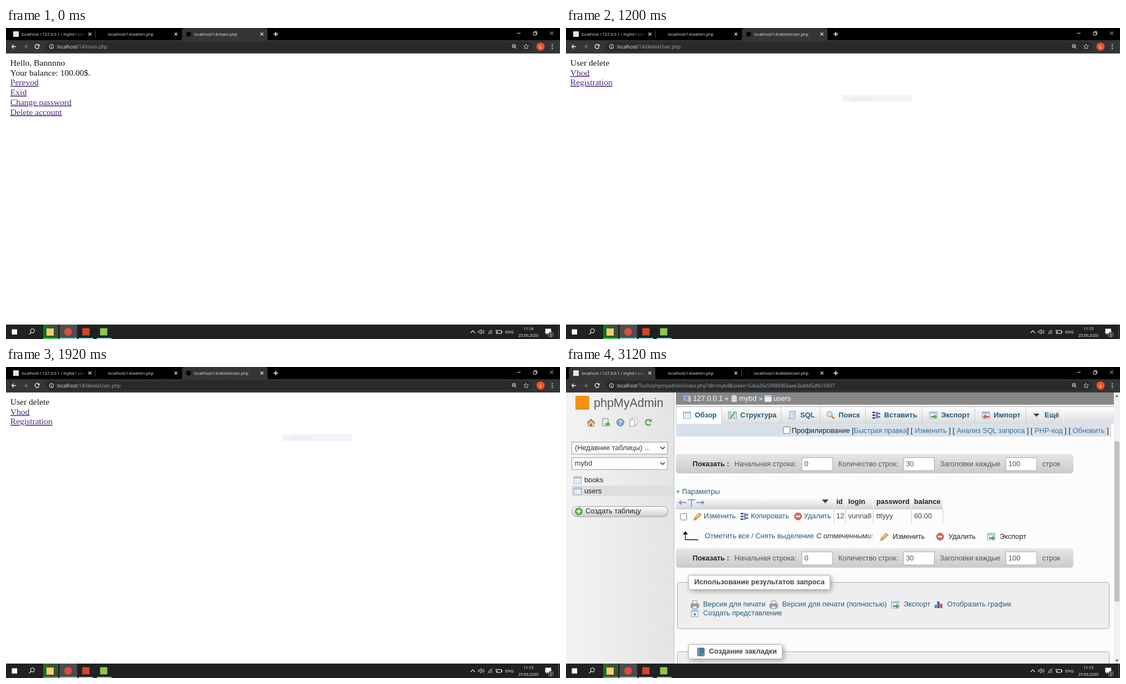
These frames come from a looping animation (998x561 px, 3.6 s). An HTML page:

```html
<!DOCTYPE html>
<html lang="ru">
<head>
<meta charset="utf-8">
<title>Browser session</title>
<style>
html, body { margin: 0; width: 100%; height: 100%; overflow: hidden; background: #fff; }
svg { display: block; width: 998px; height: 561px; }
text { white-space: pre; }
.ui { font-family: "Open Sans", "Noto Sans", sans-serif; }
.page { font-family: "Liberation Serif", "Times New Roman", serif; font-size: 15.55px; }
.pma { font-family: "Liberation Sans", Arial, sans-serif; font-size: 12.8px; }
.visited { fill: #4f2a80; text-decoration: underline; }
.b { font-weight: bold; }
.i { font-style: italic; }
</style>
</head>
<body>
<svg id="stage" viewBox="0 0 998 561" xmlns="http://www.w3.org/2000/svg"></svg>
<script>
const HOLD = 1200, LOOP = 3 * HOLD;
const LINK = '#235a81', INK = '#222';

const rect = (x, y, w, h, fill, more = '') =>
  `<rect x="${x}" y="${y}" width="${w}" height="${h}" fill="${fill}" ${more}/>`;
const circle = (x, y, r, fill, more = '') =>
  `<circle cx="${x}" cy="${y}" r="${r}" fill="${fill}" ${more}/>`;
const line = (d, stroke, w = 1, more = '') =>
  `<path d="${d}" fill="none" stroke="${stroke}" stroke-width="${w}" ${more}/>`;
const shape = (d, fill, more = '') => `<path d="${d}" fill="${fill}" ${more}/>`;
const text = (x, y, s, fill = INK, more = '') =>
  `<text x="${x}" y="${y}" fill="${fill}" ${more}>${s.replace(/&/g, '&amp;')}</text>`;
const bold = (x, y, s, fill = INK) => text(x, y, s, fill, 'class="b"');
const size = n => `font-size="${n}"`;
const at = (x, y, body) => `<g transform="translate(${x} ${y})">${body}</g>`;
const group = (cls, body, id = '') => `<g class="${cls}" ${id && `id="${id}"`}>${body}</g>`;
const grad = (id, a, b, across) =>
  `<linearGradient id="${id}" x2="${across ? 1 : 0}" y2="${across ? 0 : 1}">` +
  `<stop stop-color="${a}"/><stop offset="1" stop-color="${b}"/></linearGradient>`;

// Small icons, each centred on 0,0
const icon = {
  table: rect(-6.5, -6, 13, 12, '#fff', 'stroke="#7f9fbd"') + rect(-6, -5.5, 12, 3, '#a9c8e2') +
    line('M-2.5-2V6M2-2V6M-6 .5H6M-6 3H6', '#bdd3e8', .7),
  pencil: shape('M-7 7l1.5-5L3-6.5 7-3-2 5.5z', '#e0a94e', 'stroke="#a8712c" stroke-width=".8"') +
    line('M-3.5 2L4-4.8', '#fbdc8e', 1.5) + shape('M3-6.5L7-3 5.5-1.5 1.4-5z', '#e0a09a'),
  minus: circle(0, 0, 6.5, '#d9685a', 'stroke="#bd6156"') + rect(-4, -1.3, 8, 2.6, '#fff'),
  plus: circle(0, 0, 6.5, '#63ab50', 'stroke="#4c8f3f"') + line('M-4 0H4M0-4V4', '#fff', 2),
  copy: line('M-7-5H-2M-7 0H-2M-7 5H-2', '#345', 2.4) + rect(-1, -6, 4, 12, '#7b8ed0') +
    line('M3-3H7M3 3H7', '#4a55a5', 2.5),
  send: rect(-6.5, -6, 13, 12, '#eef4fa', 'stroke="#86a3bd"') + rect(-6, -5.5, 12, 3, '#a9c8e2') +
    shape('M-4 1H2V-2L7 2.5 2 7V4H-4z', '#5a9f5c'),
  take: rect(-6.5, -6, 13, 12, '#eef4fa', 'stroke="#8aa0bd"') + rect(-6, -5.5, 12, 3, '#9fb6e0') +
    shape('M6 1H0V-2L-6 2.5 0 7V4H6z', '#cf5c58'),
  printer: rect(-4, -7, 8, 6, '#fff', 'stroke="#888"') +
    rect(-7, -2, 14, 7, '#9aa3ad', 'rx="1.5" stroke="#69737e" stroke-width=".8"') + rect(-4, 2, 8, 5, '#e4eef8', 'stroke="#789"'),
  chart: rect(-7, 0, 4, 6, '#4d86cf') + rect(-2.5, -6, 4.5, 12, '#3d6cb8') + rect(2.5, -2, 4.5, 8, '#d65248'),
  view: rect(-6, -6, 12, 12, '#e8f0f7', 'stroke="#8aa4bc"') + rect(-6, -6, 12, 3, '#a7c4de') + circle(0, 2, 2, '#5b81a5'),
  db: shape('M-5-4C-5-7 5-7 5-4V4C5 7-5 7-5 4z', '#e4e4e4', 'stroke="#999" stroke-width=".7"') +
    line('M-5-4C-5-1 5-1 5-4M-5 0C-5 3 5 3 5 0', '#999', .7),
  server: rect(-6, -5, 9, 8, '#6e93c7', 'stroke="#dde"') + rect(1, -5, 5, 11, '#c4cad4', 'stroke="#778" stroke-width=".6"'),
  glass: line('M1 1L6 6', '#bd8343', 2.6) + circle(-2, -2, 4.5, '#d2e9fa', 'stroke="#84a3bf" stroke-width="1.3"'),
  sql: shape('M-5-7H6C3-4 6-1 4 6H-7C-3 3-6-3-5-7z', '#e4f0fb', 'stroke="#5d8fc2"') + line('M-2-4H3M-2-1H3M-2 2H2', '#7ba7d0'),
  tools: rect(-7, -6, 4, 12, '#d5e2ef', 'stroke="#7895b2"') + rect(2, -6, 5, 12, '#d9ebdb', 'stroke="#719e76"') +
    line('M-4 6L4-6', '#4f9e82', 2.2),
  book: rect(-6, -7, 12, 14, '#4a78ae', 'rx="1" stroke="#294f80"') + line('M-4-7V7', '#8db5df', 1.5) + circle(4, 5, 3, '#64ad4b'),
  home: shape('M-5 0V7H5V0z', '#f1ddb7', 'stroke="#a27c4f"') + shape('M-8 1L0-7 8 1 6 2 0-3-6 2z', '#c07a48') + rect(-1.5, 2, 3, 5, '#94643b'),
  leave: rect(-6, -7, 10, 13, '#e9e9e9', 'stroke="#888"') + shape('M-1 1H3V-2L8 3 3 8V5H-1z', '#58ae45'),
  help: circle(0, 0, 6.5, '#7fa6d2', 'stroke="#5b83b3"') + text(0, 4, '?', '#fff', 'class="b" font-size="10.5" text-anchor="middle"'),
  docs: rect(-3, -8, 9, 12, '#fff', 'stroke="#aaa"') + rect(-7, -5, 9, 12, '#f6f6f6', 'stroke="#999"'),
  reload: line('M4.5-3A5 5 0 1 0 4.5 3', '#5aa64c', 2.6) + shape('M1-1H6.5V-6.5z', '#5aa64c')
};
const put = (name, x, y) => at(x, y, icon[name]);

const defs = `<defs>${grad('side', '#f3f3f3', '#e4e4e4', true)}${grad('bar', '#e6e6e6', '#cacaca')}
${grad('tabs', '#fff', '#dcdcdc')}${grad('head', '#fff', '#d2d2d2')}${grad('pill', '#fff', '#cdcdcd')}
<linearGradient id="fade" gradientUnits="userSpaceOnUse" x1="98" x2="114">
<stop stop-color="#e8eaed"/><stop offset="1" stop-color="#e8eaed" stop-opacity="0"/></linearGradient>
<filter id="soft" x="-10%" y="-50%" width="120%" height="220%"><feDropShadow dx="3" dy="3" stdDeviation="4" flood-color="#aaa"/></filter></defs>`;

function simplePage(lines) {
  return lines.map(([s, linked], n) =>
    text(7.8, 68 + n * 17.7, s, '#111', linked ? 'class="visited"' : '')).join('');
}

function selectBox(y, s) {
  return rect(10.5, y + .5, 172.5, 21.5, '#fff', 'stroke="#999"') + text(16, y + 15, s, '#333') +
    line(`M170 ${y + 9}l4 4 4-4`, '#333', 1.5);
}

function sidebar() {
  const tools = ['home', 'leave', 'help', 'docs', 'reload'], xs = [45, 72, 98, 122, 148];
  return rect(0, 46, 195, 489, 'url(#side)') + line('M194.5 46V535', '#b9b9b9') +
    rect(17, 52, 25, 25, '#f29111') + text(50, 72, 'phpMyAdmin', '#555', size(21.5)) +
    tools.map((t, n) => put(t, xs[n], 100)).join('') +
    selectBox(135, '(Недавние таблицы) ...') + selectBox(163, 'mybd') +
    rect(10, 214, 184, 19, '#dedede') + put('table', 21, 204) + put('table', 21, 224) +
    text(33, 208, 'books') + text(33, 228, 'users') +
    rect(10.5, 251.5, 173, 18.5, 'url(#pill)', 'rx="9" stroke="#999"') + put('plus', 23, 260.5) +
    text(35, 264, 'Создать таблицу');
}

function menu() {
  const tabs = [
    [198, 232, 'table', 'Обзор'], [280, 314, 'tools', 'Структура'], [387.5, 422, 'sql', 'SQL'],
    [457.5, 491, 'glass', 'Поиск'], [539.5, 573, 'copy', 'Вставить'], [641.5, 675.5, 'send', 'Экспорт'],
    [736.5, 770.5, 'take', 'Импорт'], [828.5, 862, '', 'Ещё']];
  let s = rect(198, 46, 789, 22, '#888') + put('server', 219, 57) + put('db', 303, 57) + put('table', 364, 57) +
    [[229, '127.0.0.1'], [285.5, '»'], [312, 'mybd'], [347.5, '»'], [373.5, 'users']]
      .map(([x, t]) => text(x, 61, t, '#fff')).join('');
  s += rect(198, 71, 789, 31, 'url(#tabs)') + line('M198 71.5H987', '#aaa') +
    rect(198, 72, 82, 30, '#fff') + line('M280 102H897', '#ccc');
  for (const [x, tx, ic, label] of tabs)
    s += line(`M${x} 72V102`, '#ccc') + (ic ? put(ic, tx - 14, 87) : shape('M842 84H853L847.5 90z', '#444')) +
      bold(tx, 91, label, LINK);
  return s + line('M896.5 72V102', '#fff');
}

function profileBar() {
  const parts = [[515, '[', 'Быстрая правка', ']'], [621, '[ ', 'Изменить', ' ]'], [696.5, '[ ', 'Анализ SQL запроса', ' ]'],
    [837, '[ ', 'PHP-код', ' ]'], [905.5, '[ ', 'Обновить', ' ]']];
  return rect(198, 102.5, 784, 23, '#d8e1e9') +
    rect(391.5, 108, 12, 12, '#fff', 'rx="1.5" stroke="#777"') + text(406.5, 118.5, 'Профилирование') +
    parts.map(([x, a, b, c]) =>
      `<text x="${x}" y="118.5" fill="${INK}">${a}<tspan fill="#3c7099">${b}</tspan>${c}</text>`).join('');
}

function rowsBar(y) {
  const field = (x, s) => rect(x + .5, y + 6.5, 55.5, 23.5, '#fff', 'stroke="#aaa"') + text(x + 5, y + 22, s, '#555');
  const label = (x, s) => text(x, y + 22, s, '#555');
  return rect(198, y, 716, 35, 'url(#bar)', 'rx="5"') + bold(228, y + 22, 'Показать :') +
    label(303.5, 'Начальная строка:') + field(424.5, '0') + label(490.5, 'Количество строк:') + field(607.5, '30') +
    label(673.5, 'Заголовки каждые') + field(792, '100') + label(858, 'строк');
}

function grid() {
  const cols = [[487, 'id', '12'], [508.5, 'login', 'vunna8'], [559, 'password', 'tttyyy'], [627, 'balance', '60.00']];
  const edges = [482.5, 503.5, 553.5, 622.5, 679];
  return text(198, 229, '+ Параметры', LINK) + rect(198, 235, 481, 22, 'url(#head)') +
    line('M204 244.5H217M208 241L204 244.5 208 248M235 244.5H248M244 241L248 244.5 244 248M219 239.5H233M226 239.5V252', '#5f7fb4', 1.4) +
    shape('M461 239H473L467 246z', '#444') +
    edges.map(x => line(`M${x} 235V257`, '#fff') + line(`M${x} 257V283`, '#ccc')).join('') +
    cols.map(([x, h, v]) => bold(x, 247, h) + text(x, 273, v, '#444')).join('') +
    rect(206, 264.5, 11.5, 11.5, '#fff', 'rx="1.5" stroke="#777"') +
    put('pencil', 237, 269.5) + text(248, 273, 'Изменить', LINK) +
    put('copy', 321.5, 269.5) + text(333, 273, 'Копировать', LINK) +
    put('minus', 418, 269.5) + text(428.5, 273, 'Удалить', LINK) +
    line('M215 298V311.5H238', '#111', 1.3) + shape('M215 296L219.5 302H210.5z', '#111') +
    text(250, 309, 'Отметить все / Снять выделение', LINK) + text(451, 309, 'С отмеченными:', '#333', 'class="i"') +
    put('pencil', 573.5, 306) + text(588.5, 309.5, 'Изменить') +
    put('minus', 674, 306) + text(689, 309.5, 'Удалить') +
    put('send', 766, 306) + text(781, 309.5, 'Экспорт');
}

function box(y, h, w, label, tx) {
  return rect(200.5, y + .5, 778, h, '#eee', 'rx="4" stroke="#aaa"') +
    rect(220.5, y - 12.5, w, 26, '#fff', 'rx="2" stroke="#aaa" filter="url(#soft)"') + bold(tx, y + 4, label, '#444');
}

function results() {
  const links = [['printer', 232, 247, 'Версия для печати'], ['printer', 374, 389.5, 'Версия для печати (полностью)'],
    ['send', 593, 608, 'Экспорт'], ['chart', 671, 686.5, 'Отобразить график']];
  return box(388, 83.5, 255, 'Использование результатов запроса', 231) +
    links.map(([ic, x, tx, s]) => put(ic, x, 429) + text(tx, 432, s, LINK)).join('') +
    put('view', 232, 444.5) + text(247, 448, 'Создать представление', LINK) +
    box(513, 60, 169, 'Создание закладки', 257.5) + put('book', 243, 514);
}

function adminPage() {
  return rect(0, 46, 998, 489, '#fcfcfc') + sidebar() + menu() + profileBar() + rowsBar(157) + grid() + rowsBar(327) + results() +
    rect(987, 46, 11, 489, '#f1f1f1') + rect(988, 134, 9, 289, '#c1c1c1') +
    shape('M989.5 54H995.5L992.5 50.5z', '#555') + shape('M989.5 528H995.5L992.5 531.5z', '#555');
}

function browser() {
  const close = x => line(`M${x - 2.5} 8.5l5 5m0-5l-5 5`, '#ddd', 1.2);
  const white = '#e8eaed';
  return rect(0, 0, 998, 23, '#000') +
    `<path id="tab" fill="#343536"/><path id="gap" stroke="#555" fill="none"/>` +
    rect(13, 6, 10, 10, '#ece6da') + circle(329, 11, 4.6, '#050505') +
    `<svg x="28" y="0" width="113" height="22">${text(0, 13.5, 'localhost / 127.0.0.1 / mybd / users', 'url(#fade)', size(7.4))}</svg>` +
    text(183.5, 13.5, 'localhost/14/admin.php', white, size(7.4)) +
    `<text id="title" x="338.8" y="13.5" fill="${white}" font-size="7.4"></text>` +
    close(151) + close(306) + close(461) + line('M482 11H490M486 7V15', '#fff', 1.4) +
    line('M920.5 9.5H927', '#ddd') + line('M950 8H955V13H950zM951.5 8V6.5H956.5V11.5H955', '#ddd') +
    line('M980 6.5l6 6m0-6l-6 6', '#ddd') +
    rect(0, 22, 998, 24, '#343536') + rect(71, 24.5, 877, 18, '#292a2b', 'rx="9"') +
    line('M18 33.5H10.5M14 30L10.5 33.5 14 37', white, 1.3) + line('M31 33.5H38.5M35 30L38.5 33.5 35 37', '#77787b', 1.2) +
    line('M59 31A3.8 3.8 0 1 0 59.6 34.5', white, 1.3) + shape('M60.5 29V33H56.5z', white) +
    circle(82, 33.5, 3.8, 'none', `stroke="${white}"`) + line('M82 33V36M82 31V32', white) +
    `<text x="92" y="36.8" font-size="8.65" fill="#a6a9ad"><tspan fill="${white}">localhost</tspan><tspan id="path"></tspan></text>` +
    circle(915, 32.5, 3, 'none', 'stroke="#ccc" stroke-width="1.1"') + line('M917.2 34.7L920 37.5M913.5 32.5H916.5M915 31V34', '#ccc', 1) +
    line('M937 29.2l1.3 2.9 3.2.3-2.4 2.1.7 3.1-2.8-1.6-2.8 1.6.7-3.1-2.4-2.1 3.2-.3z', '#ccc', .9) +
    circle(963, 33.5, 7.3, '#f4511e') + text(963, 36.5, 'E', '#fff', 'font-size="8" text-anchor="middle"') +
    [30, 33.5, 37].map(y => circle(984, y, 1, white)).join('');
}

function taskbar() {
  const mid = 'text-anchor="middle" font-size="7.1"';
  const under = (x, w, c = '#8fd4d2') => rect(x, 559, w, 2, c);
  return rect(0, 535, 998, 26, '#202122') +
    rect(10.5, 543.5, 9.5, 9.5, '#fff') +
    circle(47.8, 546.3, 3.6, 'none', 'stroke="#eee" stroke-width="1.1"') + line('M45.2 549L41.5 552.7', '#eee', 1.2) +
    rect(67, 535, 27, 26, '#39503c') + rect(67, 535, 9, 26, '#1d6b25') + under(67, 27, '#2fd03a') + rect(73, 542, 13, 13, '#f3cf68') +
    rect(96.5, 535, 31.5, 26, '#4b4d4e') + under(96.5, 31.5) + circle(112, 548, 7, '#dc4c3e') +
    under(131, 26) + rect(137.5, 541.5, 13, 13, '#d24726') +
    under(164, 26) + rect(169.5, 541.5, 13, 13, '#90c64b') +
    line('M837 550l4-4 4 4', '#eee', 1.1) +
    line('M851 546.5H853L856 544V552L853 549.5H851zM858 546Q859.3 548 858 550M860 544.5Q862.2 548 860 551.5', '#eee', .9) +
    line('M869 552A7 7 0 0 1 876 545M871.5 552A4.5 4.5 0 0 1 876 547.5M874 552A2 2 0 0 1 876 550', '#ddd', 1) +
    line('M885 545.5H892.5V551H885zM893.5 547V549.5M883 544V549M883 549Q883 552 886 551', '#eee', 1) +
    text(899.3, 551, 'ENG', '#fff', size(7.4)) +
    `<text id="clock" x="941" y="545" fill="#fff" ${mid}></text>` + text(941, 556.5, '25.06.2020', '#fff', mid) +
    shape('M971.5 542.5H982V551H975.5L973.5 553.5V551H971.5z', '#fff') +
    circle(981.3, 553, 4.6, '#333637', 'stroke="#ccc" stroke-width=".7"') + text(981.3, 555.7, '5', '#fff', mid) +
    line('M995.5 535V561', '#555');
}

const account = simplePage([['Hello, Bannnno'], ['Your balance: 100.00$.'], ['Perevod', 1], ['Exid', 1],
  ['Change password', 1], ['Delete account', 1]]);
const deleted = simplePage([['User delete'], ['Vhod', 1], ['Registration', 1]]) +
  rect(497, 121, 126, 12, '#f0f4f8') + text(514, 129.5, 'Open page', '#dfe5eb', 'class="ui" font-size="7.4"');

const stage = document.getElementById('stage');
stage.innerHTML = defs + rect(0, 0, 998, 561, '#fff') + group('page', account, 'view0') + group('page', deleted, 'view1') +
  group('pma', adminPage(), 'view2') + group('ui', browser()) + group('ui', taskbar());

const $ = id => document.getElementById(id);
const tabShape = (a, b) => `M${a - 4} 23Q${a} 23 ${a} 19V5Q${a} 0 ${a + 5} 0H${b - 5}Q${b} 0 ${b} 5V19Q${b} 23 ${b + 4} 23z`;
const scenes = [
  { title: 'main.php', path: '/14/main.php', clock: '11:14', tab: [317, 471], gap: 161 },
  { title: 'deleteUser.php', path: '/14/deleteUser.php', clock: '11:15', tab: [317, 471], gap: 161 },
  { title: 'deleteUser.php', clock: '11:15', tab: [5, 161], gap: 316.5,
    path: '/Tools/phpmyadmin/index.php?db=mybd&token=5a6a26c59989456aee3add45dfb19437' }
];

let shown = -1;
function draw(ms) {
  const n = Math.floor((ms % LOOP) / HOLD);
  if (n === shown) return;
  shown = n;
  const s = scenes[n];
  scenes.forEach((_, k) => $('view' + k).style.display = k === n ? '' : 'none');
  $('title').textContent = 'localhost/14/' + s.title;
  $('path').textContent = s.path;
  $('clock').textContent = s.clock;
  $('tab').setAttribute('d', tabShape(...s.tab));
  $('gap').setAttribute('d', `M${s.gap} 5V17`);
}

const start = performance.now();
function tick() {
  draw(performance.now() - start);
  requestAnimationFrame(tick);
}
tick();
</script>
</body>
</html>
```
